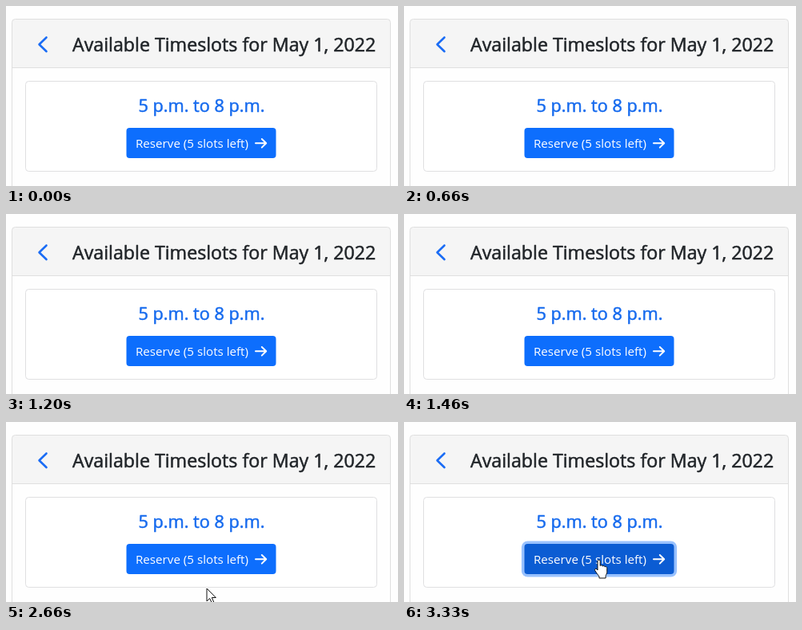
An HTML page for the animation above (3.4 s loop, 490 by 226 pixels).

```html
<!DOCTYPE html>
<html lang="en">
<head>
<meta charset="utf-8">
<title>Timeslots</title>
<style>
  html, body { margin: 0; width: 100%; height: 100%; overflow: hidden; background: #fefefe; }
  svg { display: block; width: 490px; height: 226px; }
  text { font-family: "Open Sans", "Noto Sans", sans-serif; font-weight: 400; }
  .medium { stroke-width: .55; stroke-linejoin: round; }
  .line { fill: none; stroke-linecap: round; stroke-linejoin: round; }
  .cursor { fill: #fff; stroke: #111; stroke-linejoin: round; }
</style>
</head>
<body>
<svg viewBox="0 0 490 226">
  <rect width="490" height="226" fill="#fefefe"/>
  <path d="M7.5 77.5V20.5a4 4 0 0 1 4-4H476.500a4 4 0 0 1 4 4V77.500Z" fill="#f5f5f5"/>
  <rect x="7.500" y="16.500" width="473" height="240" rx="4" fill="none" stroke="#dfdfdf"/>
  <path d="M8 77.500H480" stroke="#dfdfdf"/>
  <path class="line" d="M50.500 39.500L41.500 48.200L50.500 57" stroke="#1a6cf5" stroke-width="2.600"/>
  <text class="medium" x="83" y="57" font-size="23.2" fill="#212529" stroke="#212529">Available Timeslots for May 1, 2022</text>

  <rect x="24.500" y="94.500" width="439" height="113" rx="4" fill="#fff" stroke="#dfdfe1"/>
  <text class="medium" x="244.500" y="133.300" font-size="21.7" text-anchor="middle" fill="#176bee" stroke="#176bee">5 p.m. to 8 p.m.</text>

  <rect id="ring" fill="#98c1fe"/>
  <rect id="button" x="150.500" y="153" width="187" height="38" rx="4"/>
  <text x="162" y="178" font-size="15.17" fill="#fff">Reserve (5 slots left)</text>
  <path class="line" d="M312 172.300H325M319.800 167L325.200 172.300L319.800 177.600" stroke="#fff" stroke-width="2"/>

  <path id="arrow" class="cursor" d="M.5 .5V16.500L4.200 13L6.800 18.800L9.300 17.700L6.800 12H11.800Z"/>
  <path id="hand" class="cursor" d="M4.500 13.500V2.500C4.500 .2 7.700 .2 7.700 2.500V8C8.300 6.900 10.300 7 10.800 8.600C11.500 7.600 13.300 7.900 13.700 9.400C14.600 8.600 16.300 9.200 16.300 11V16C16.300 18.300 14.600 19.300 14.600 21V23.500H6.500V21.500C5 19.500 3.300 17.300 1.400 14.300C.2 12.300 2.300 11 3.500 12.300Z"/>
</svg>
<script>
const LOOP = 3400, STEP = 200 / 3;
const [ring, button, arrow, hand] =
  ["ring", "button", "arrow", "hand"].map(id => document.getElementById(id));

const BLUE = [13, 110, 253], HOVER = [11, 92, 211];
const clamp = v => Math.max(0, Math.min(1, v));
const ease = p => p * p * (3 - 2 * p);
const fade = (t, start) => ease(clamp((t - start) / 150));

function place(el, shown, x, y) {
  el.setAttribute("display", shown ? "inline" : "none");
  el.setAttribute("transform", `translate(${x} ${y})`);
}

function draw(ms) {
  const step = Math.floor((ms + 6.7) / STEP);
  const t = step * STEP;

  const hover = fade(t, 2700);
  const rgb = BLUE.map((c, i) => Math.round(c + (HOVER[i] - c) * hover));
  button.setAttribute("fill", `rgb(${rgb})`);

  const focus = fade(t, 2900), spread = 3.6 * focus;
  const box = { x: 150.5 - spread, y: 153 - spread, width: 187 + 2 * spread,
                height: 38 + 2 * spread, rx: 4 + spread, opacity: focus };
  for (const key in box) ring.setAttribute(key, box[key]);

  // the pointer rises from below and becomes a hand over the button
  place(arrow, step >= 39 && step <= 40, 250.5, 208.5 + 15 * (40 - step));
  const settle = step === 41 ? 1 : 0;
  place(hand, step >= 41, 237.5 + settle, 172.5 + 4 * settle);
}

function tick() {
  draw(performance.now() % LOOP);
  requestAnimationFrame(tick);
}
tick();
</script>
</body>
</html>
```
